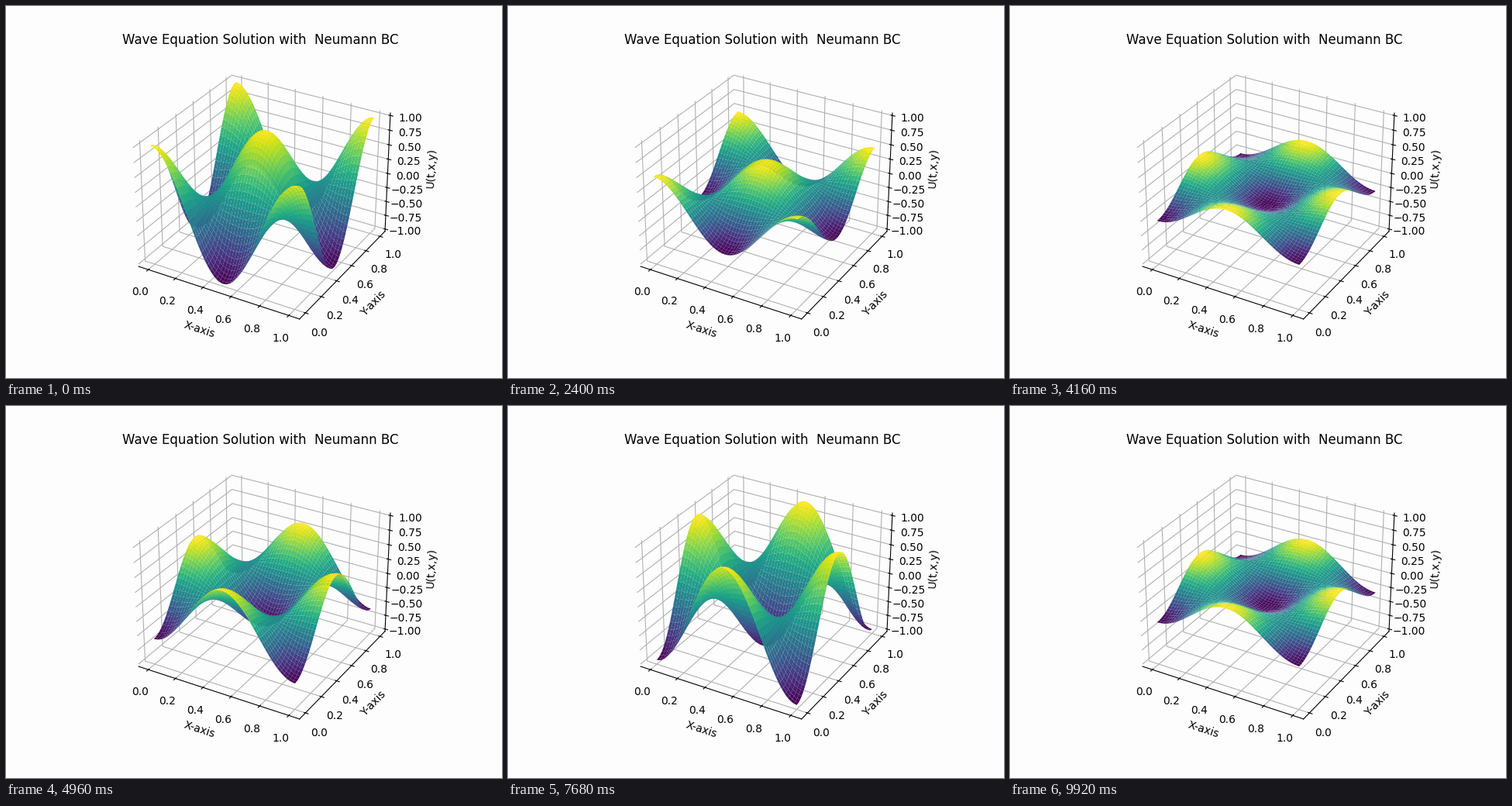
These frames come from a looping animation (640x480 px, 10 s). A matplotlib script:

```python
import numpy as np
import matplotlib.pyplot as plt
from matplotlib.animation import FuncAnimation

FRAMES, INTERVAL = 125, 80
DT = 0.004
OMEGA = 2 * np.pi * np.sqrt(2)
BACK = "#fdfdfd"

grid = np.linspace(0, 1, 50)
X, Y = np.meshgrid(grid, grid)
MODE = np.cos(2 * np.pi * X) * np.cos(2 * np.pi * Y)

fig = plt.figure(figsize=(6.4, 4.8), dpi=100, facecolor=BACK)
ax = fig.add_subplot(projection="3d", facecolor=BACK)
ax.set_title("Wave Equation Solution with  Neumann BC")
ax.set_xlabel("X-axis")
ax.set_ylabel("Y-axis")
ax.set_zlabel("U(t,x,y)")
for axis in (ax.xaxis, ax.yaxis, ax.zaxis):
    axis.set_pane_color(BACK)

surface = None


def update(i):
    """Redraw the standing wave; the picture changes every second tick."""
    global surface
    if surface is not None and i % 2:
        return surface,
    if surface is not None:
        surface.remove()
    surface = ax.plot_surface(X, Y, np.cos(OMEGA * DT * i) * MODE, cmap="viridis")
    ax.set_zlim(-1, 1, view_margin=1 / 48)
    return surface,


anim = FuncAnimation(fig, update, frames=FRAMES, interval=INTERVAL,
                     init_func=lambda: update(0), repeat=True, repeat_delay=0)
plt.show()
```
